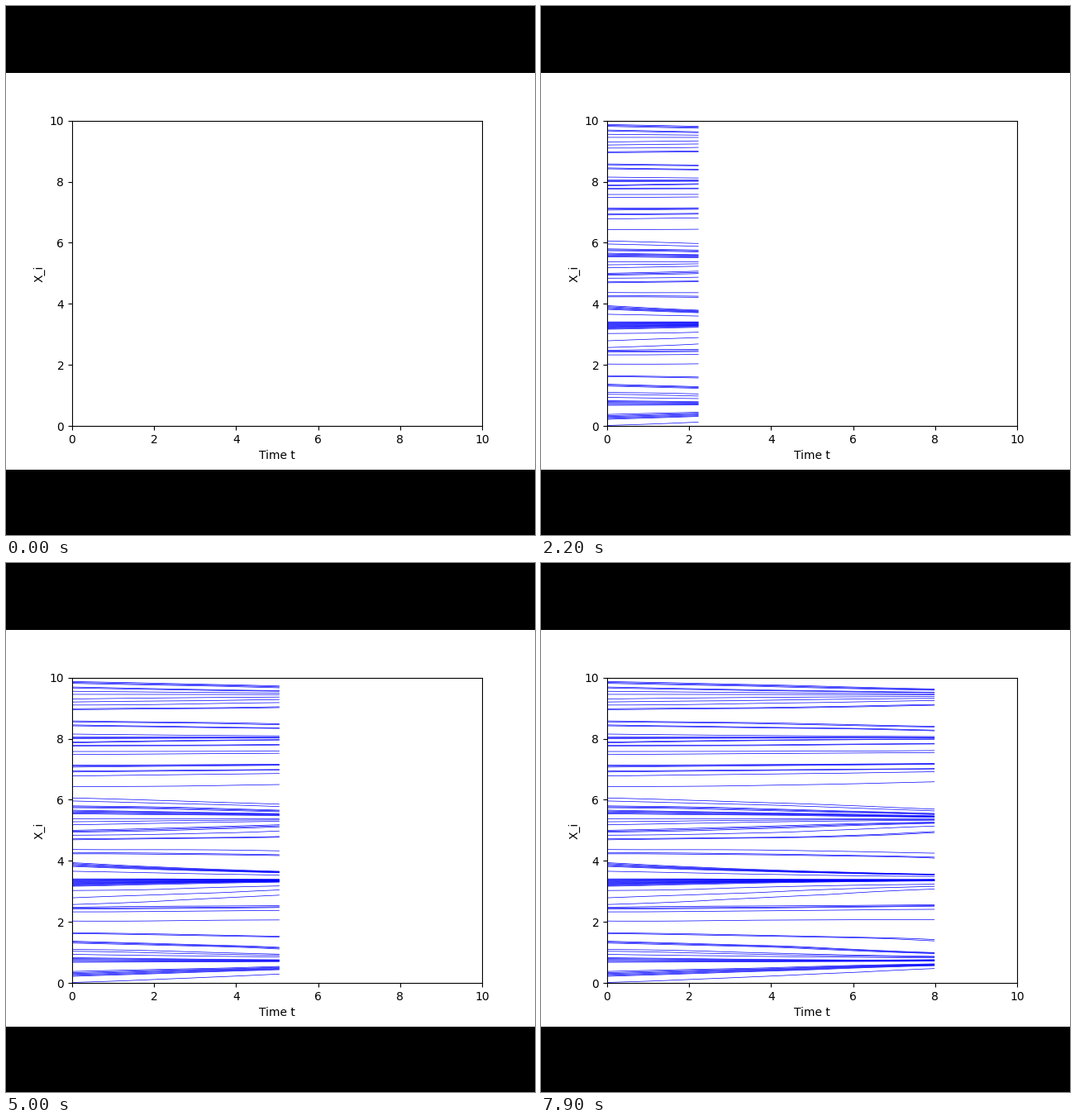
Write a matplotlib script that moves like this. It is 640 px wide and 640 px high and loops after 8000 ms.

```python
import numpy as np
import matplotlib.pyplot as plt
from matplotlib.animation import FuncAnimation
from matplotlib.patches import Rectangle

SIZE, DPI = 640, 100
FRAMES, STEP_MS = 80, 100
BAND_Y, BAND_H = 79, 480

REACH = 0.725  # agents further apart than this ignore each other
PULL = 1.1
NEAR, WIDE = 0.03, 0.1


def ladders(starts, count=1, step=0.0):
    """Evenly spaced groups of agents, one group above each start."""
    return np.add.outer(starts, step * np.arange(count)).ravel()


def simulate(x, times):
    """Bounded-confidence model: each agent drifts towards its neighbours."""
    path = [x]
    for dt in np.diff(times):
        gap = x - x[:, None]
        drift = np.where(np.abs(gap) < REACH, gap, 0).mean(axis=1)
        x = x + dt * PULL * drift
        path.append(x)
    return np.array(path)


start = np.concatenate([
    ladders([0.02, 0.38, 0.83, 1.10, 2.03, 2.33, 2.57, 2.79, 3.03,
             3.66, 4.37, 4.84, 6.43, 6.78, 8.15]),
    ladders([1.62, 4.23, 4.69, 6.91, 7.76, 7.86, 8.42, 8.55, 8.95, 9.66],
            2, NEAR),
    ladders([1.31, 2.42, 4.94, 5.74, 7.07, 8.00, 9.81], 3, NEAR),
    ladders([0.22, 0.68, 3.82, 5.54], 5, NEAR),
    ladders([0.94, 5.96, 7.48, 9.45], 2, WIDE),
    ladders([5.18, 9.10], 3, WIDE),
    ladders([3.17], 13, 0.02),
])
times = np.linspace(0, 10, 100)
paths = simulate(start, times)

fig = plt.figure(figsize=(SIZE / DPI, SIZE / DPI), dpi=DPI, facecolor="black")
fig.add_artist(Rectangle((0, BAND_Y / SIZE), 1, BAND_H / SIZE, color="white",
                         lw=0, zorder=-1, transform=fig.transFigure))
ax = fig.add_axes([0.125, (BAND_Y + 0.11 * BAND_H) / SIZE,
                   0.775, 0.77 * BAND_H / SIZE])
ax.set(xlim=(0, 10), ylim=(0, 10), xlabel="Time t", ylabel="X_i")
lines = [ax.plot([], [], color="blue", lw=0.5)[0] for _ in start]


def update(frame):
    n = frame + 1
    for line, path in zip(lines, paths.T):
        line.set_data(times[:n], path[:n])
    return lines


anim = FuncAnimation(fig, update, frames=FRAMES, interval=STEP_MS,
                     repeat=True, repeat_delay=0)
plt.show()
```
